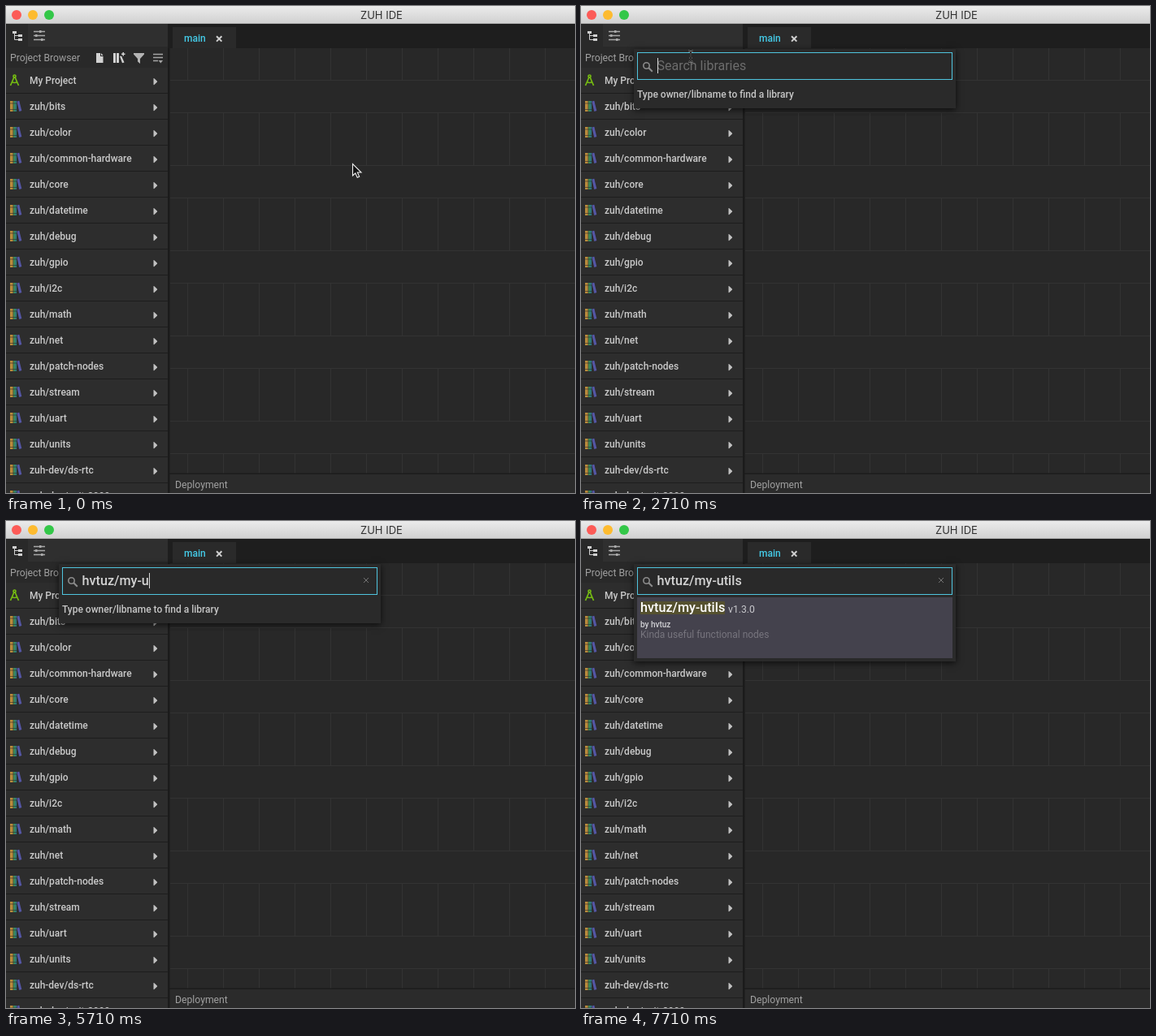
These frames come from a looping animation (700 by 600 pixels, 8000 ms). An HTML page:

```html
<!DOCTYPE html>
<html lang="en">
<head>
<meta charset="utf-8">
<title>Library search</title>
<style>
  html, body { margin: 0; width: 100%; height: 100%; overflow: hidden; background: #282828; }
  #stage { position: relative; width: 700px; height: 600px; overflow: hidden; font-family: Roboto, sans-serif; }
  #stage > svg { position: absolute; left: 0; top: 0; }
  text { font: 500 12px Roboto, sans-serif; fill: #cacaca; }
  text.dim { font-weight: 400; font-size: 12.2px; fill: #a0a0a0; }
  text.ui { font: 400 13px Inter, sans-serif; fill: #303030; }
  [hidden] { display: none !important; }

  #popup {
    position: absolute; left: 65px; top: 53px; width: 396px; height: 73px;
    background: #2a2a2a; box-shadow: 0 2px 8px rgba(0, 0, 0, .7);
  }
  #popup.loading { height: 41px; }
  #popup.found { height: 120px; }
  #popup > * { position: absolute; white-space: pre; }
  #field {
    left: 4px; top: 4px; width: 388px; height: 34px; box-sizing: border-box;
    border: 1px solid #4fc4de; background: #292929;
  }
  #icons { left: 4px; top: 4px; }
  #query { left: 28.5px; top: 4px; font: 500 16.2px/33px Roboto, sans-serif; color: #d2d2d2; }
  #caret { position: absolute; top: 7px; width: 1px; height: 19px; background: #d8d8d8; }
  #hint { left: 28.5px; top: 4px; font: 400 16px/33px Roboto, sans-serif; color: #6d6d6d; }
  #help { left: 4px; top: 46px; font: 500 12px/20px Roboto, sans-serif; color: #c6c6c6; }
  #result { left: 4px; top: 41px; width: 388px; height: 75px; background: #44424d; }
  #result > * { position: absolute; left: 4px; }
  #name { top: 5px; font: 500 16.2px/16px Roboto, sans-serif; color: #fff; background: #55512f; }
  #version { top: 6px; left: 112px !important; font: 400 12.2px/18px Roboto, sans-serif; color: #c8c8cc; }
  #author { top: 27px; font: 500 10px/13px Roboto, sans-serif; color: #d0d0d4; }
  #about { top: 38px; font: 400 12px/16px Roboto, sans-serif; color: #77757e; }
</style>
</head>
<body>
<div id="stage">
  <svg width="700" height="600" viewBox="0 0 700 600">
    <defs>
      <linearGradient id="chrome" x2="0" y2="1">
        <stop stop-color="#ebebeb"/><stop offset="1" stop-color="#d0d0d0"/>
      </linearGradient>
      <g id="books">
        <path fill="#b98b3c" d="M5 9h3.6v13H5z"/>
        <path fill="#3f8f57" d="M9.2 9h2v13h-2z"/>
        <path fill="#2f7f83" d="M11.2 9h1.8v13h-1.8z"/>
        <path fill="#5556a5" d="M13.3 9.6l3-.8 3 12.2-3 .9z"/>
        <path stroke="#2d2d2d" d="M5 12h8M5 19.5h8" opacity=".6"/>
      </g>
      <path id="more" fill="#c2c2c2" d="M181.5 13.6q0-1 .9-.4l3.4 3.2q.7.7 0 1.4l-3.4 3.1q-.9.6-.9-.4z"/>
    </defs>

    <!-- canvas -->
    <rect x="201" y="52" width="499" height="524" fill="#282828"/>
    <g id="grid" stroke="#333" shape-rendering="crispEdges"></g>

    <!-- tab strip -->
    <rect x="199" y="22" width="501" height="30" fill="#1e1e1e"/>
    <rect x="205" y="26" width="78" height="26" fill="#2a2a2a"/>
    <text x="219" y="44" style="fill:#44cbe8">main</text>
    <path d="M259 37.2l6.4 6.4m0-6.4l-6.4 6.4" stroke="#d0d0d0" stroke-width="2"/>

    <!-- bottom panel -->
    <rect x="201" y="577" width="499" height="23" fill="#2b2b2b"/>
    <rect x="201" y="575.5" width="499" height="1.5" fill="#1c1c1c"/>
    <text class="dim" x="208" y="594">Deployment</text>

    <!-- sidebar -->
    <rect x="199" y="52" width="2.5" height="548" fill="#1b1b1b"/>
    <rect y="22" width="199" height="54" fill="#292929"/>
    <rect x="27" y="22" width="172" height="28" fill="#2f2f2f"/>
    <g fill="#d0d0d0">
      <path d="M8 31h5v3H8zM15 35h5v3h-5zM15 40h5v3h-5z"/>
      <path d="M10.5 34v7.5H15M10.5 36.500H15" fill="none" stroke="#d0d0d0"/>
    </g>
    <g fill="#a9a9a9">
      <path d="M34 31.500h14M34 36.500h14M34 41.500h14" stroke="#a9a9a9" stroke-width="1.3"/>
      <path d="M41 30h2.500v3H41zM36 35h2.500v3H36zM43 40h2.500v3H43z"/>
    </g>
    <text class="dim" x="5" y="68">Project Browser</text>
    <rect id="hover" x="127" y="52" width="24" height="24" fill="#3e3e3e"/>
    <g fill="#d2d2d2">
      <path d="M111 58h5v4h3.500v8H111zM117 58l2.500 3H117z"/>
      <path d="M132 58h3v12h-3zM136 58h3v12h-3zM140 62l2-.5 3.500 8-2.500.7zM142 58.500h1.500V57h1.500v1.500h1.500V60H145v1.500h-1.500V60H142z"/>
      <path fill="#b4b4b4" d="M157 58h13v1.500l-5 5.500v6l-3-2.500V65l-5-5.500z"/>
    </g>
    <path d="M181 59.500h12M181 63.500h12M181 67.500h6" stroke="#a5a5a5" stroke-width="1.4"/>
    <path d="M187.500 67h5.500l-2.700 3.500z" fill="#a5a5a5"/>
    <g id="rows"></g>
    <g fill="none" stroke="#76bd12" stroke-width="1.7">
      <path d="M10 87.500L5.500 98M11 87.500L15.500 98M7 93.500q3.500 2 7 0"/>
      <circle cx="10.500" cy="86.500" r="1.500"/>
    </g>

    <!-- window frame -->
    <rect width="700" height="22" fill="url(#chrome)"/>
    <rect y="21" width="700" height="1" fill="#adadad"/>
    <circle cx="13" cy="11" r="6" fill="#fc5b57"/>
    <circle cx="33" cy="11" r="6" fill="#fdbb2f"/>
    <circle cx="53" cy="11" r="6" fill="#33c748"/>
    <text class="ui" x="436" y="16">ZUH IDE</text>
  </svg>

  <div id="popup">
    <div id="field"></div>
    <svg id="icons" width="388" height="34" fill="none" stroke="#8c8c8c">
      <g id="lens" stroke-width="1.6"><circle cx="11.500" cy="16.500" r="3.700"/><path d="M14.300 19.300l4.500 4.500" stroke-width="2"/></g>
      <circle id="spinner" cx="12.500" cy="17.500" r="5" stroke-width="1.7" stroke-dasharray="26 5.400"/>
      <path id="clear" d="M371 13l6 6m0-6l-6 6" stroke="#747474"/>
    </svg>
    <span id="hint">Search libraries</span>
    <span id="query"><span id="typed"></span><i id="caret"></i></span>
    <span id="help">Type owner/libname to find a library</span>
    <div id="result">
      <span id="name">hvtuz/my-utils</span><span id="version">v1.3.0</span>
      <span id="author">by hvtuz</span><span id="about">Kinda useful functional nodes</span>
    </div>
  </div>

  <svg width="700" height="600" viewBox="0 0 700 600">
    <g id="tooltip">
      <rect x="133.500" y="79.500" width="69" height="19" fill="#e3e3e3" stroke="#bcbcbc"/>
      <text class="ui" x="140" y="93" style="font-size:11px">Add library</text>
    </g>
    <path id="arrow" d="M0 0v14.500l3.300-3 2.400 5.300 2.500-1.100-2.400-5.200H10.500z" fill="#111" stroke="#f0f0f0" stroke-width="1.100"/>
    <path id="hand" d="M134.500 63.500q1.500-1.500 2.500.5l1.200 4 .5-1q1.400-.6 1.800.8 1.600-.5 1.800 1 1.500 0 1.400 1.600l-.6 3.500-1 3h-6.500q-1.500-3-4-5.500-.5-1.800 1.800-1.200l1.800 1.300z" fill="#fff" stroke="#111"/>
    <g id="beam" fill="none">
      <path d="M132 55.500q3 0 3 2v9.500q0 2-3 2M138 55.500q-3 0-3 2v9.500q0 2 3 2M133.500 64h3" stroke="#9a9a9a" stroke-width="2"/>
      <path d="M132 55.500q3 0 3 2v9.500q0 2-3 2M138 55.500q-3 0-3 2v9.500q0 2 3 2M133.500 64h3" stroke="#181818"/>
    </g>
  </svg>
</div>

<script>
const LOOP = 8000, FPS = 7;
const QUERY = 'hvtuz/my-utils';
const $ = id => document.getElementById(id);
const show = (id, on) => $(id).toggleAttribute('hidden', !on);

function buildGrid() {
  let d = '';
  for (let y = 26; y < 576; y += 105) {
    const top = Math.max(y, 52), bottom = Math.min(y + 65, 576);
    if (y > 52) d += `M202 ${y + .5}H700`;
    if (y + 65 < 576) d += `M202 ${y + 65.5}H700`;
    for (let x = 223.5; x < 700; x += 44) d += `M${x} ${top}V${bottom}`;
  }
  $('grid').innerHTML = `<path d="${d}"/>`;
}

function buildRows() {
  const libs = 'bits color common-hardware core datetime debug gpio i2c math net patch-nodes stream uart units';
  const names = ['My Project', ...libs.split(' ').map(n => 'zuh/' + n), 'zuh-dev/ds-rtc', 'zuh-dev/unit-2000'];
  $('rows').innerHTML = names.map((name, i) => `<g transform="translate(0 ${76 + 32 * i})">
    <rect width="199" height="32" fill="#2d2d2d"/><rect y="31" width="199" height="1" fill="#1d1d1d"/>
    ${i ? '<use href="#books"/>' : ''}<text x="29" y="20">${name}</text><use href="#more"/></g>`).join('');
}

const ticksSince = (t, from) => Math.round((t - from) * FPS / 1000);

function typedCount(t) {
  if (t < 4290) return 0;
  if (t < 5290) return Math.min(6, 1 + 2 * ticksSince(t, 4290));
  return Math.min(QUERY.length, 7 + ticksSince(t, 5290));
}

// Spans in which the caret is blinked off
const caretOff = [[0, 2140], [3000, 3570], [4000, 4290], [5000, 5290], [6710, 7290], [7710, LOOP]];

function render(t) {
  const open = t >= 2140, onButton = t >= 860 && !open;
  const loading = t >= 6710 && t < 7430, found = t >= 7430;
  const count = typedCount(t);

  const p = Math.min(1, t / 860), ease = p * p * (3 - 2 * p);
  $('arrow').setAttribute('transform', `translate(${426.5 - 290 * ease} ${194.5 - 132 * ease})`);
  show('arrow', t < 860);
  show('hand', onButton);
  show('hover', onButton);
  show('tooltip', t >= 1430 && !open);
  show('beam', open && !count);

  show('popup', open);
  $('popup').className = loading ? 'loading' : found ? 'found' : '';
  show('help', !loading && !found);
  show('result', found);
  show('lens', !loading);
  show('spinner', loading);
  $('spinner').setAttribute('transform', `rotate(${t * .72 % 360} 12.5 17.5)`);
  show('clear', count > 0);
  show('hint', !count);
  $('typed').textContent = QUERY.slice(0, count);
  show('caret', !caretOff.some(([a, b]) => t >= a && t < b));
}

buildGrid();
buildRows();
const start = performance.now();
function frame() {
  const ms = (performance.now() - start) % LOOP;
  const tick = Math.floor((ms + 5) * FPS / 1000) % (LOOP * FPS / 1000);
  render(Math.round(tick * 100 / FPS) * 10);
  requestAnimationFrame(frame);
}
frame();
</script>
</body>
</html>
```
